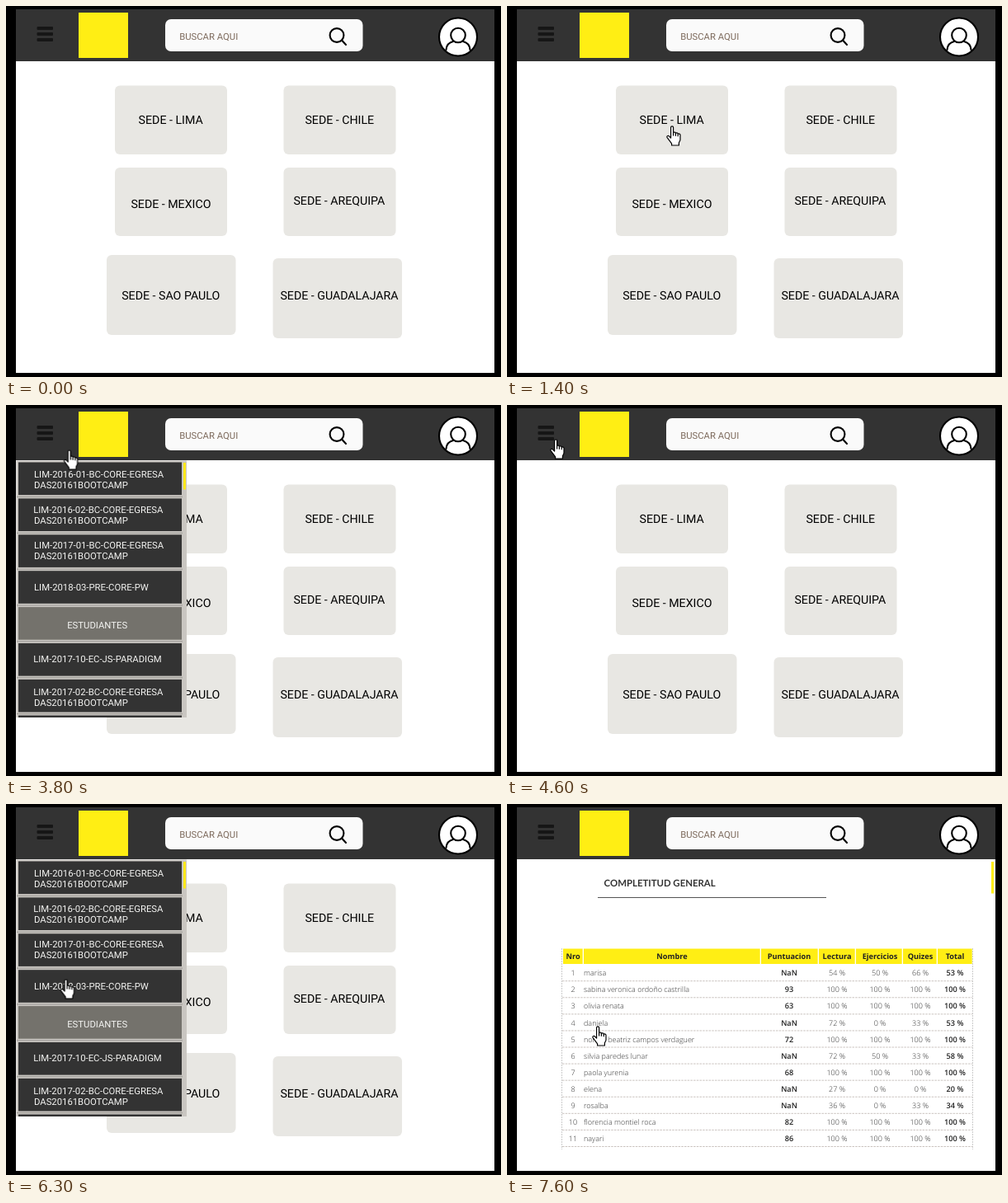
These frames come from a looping animation (600 px wide and 450 px high, 8 s). An HTML page:

```html
<!DOCTYPE html>
<html lang="es">
<head>
<meta charset="utf-8">
<title>Sedes</title>
<style>
  html, body { margin: 0; width: 100%; height: 100%; overflow: hidden; background: #000; }
  svg { display: block; width: 600px; height: 450px; font-family: Roboto, sans-serif; text-rendering: geometricPrecision; }
  #menu, #report, #show, #hand { animation: 8s step-end -4ms infinite; }
  #menu { animation-name: menu; }
  #report { animation-name: report; }
  #show { animation-name: show; }
  #hand { animation-name: move; }
  #cards { font-size: 14.2px; }
  #menu text { font-size: 11.3px; fill: #f4f4f2; }
  #report { font: 300 9px "Open Sans", "Noto Sans", sans-serif; fill: #333; }
  #report .bold { font-weight: 600; font-size: 9.2px; fill: #222; }
  #report .head { font-weight: 700; font-size: 9.2px; fill: #222; }
  .mid { text-anchor: middle; }

  @keyframes menu {
    0% { opacity: 0; }
    30% { opacity: 1; }
    57.5% { opacity: 0; }
    71.25% { opacity: 1; }
    95%, 100% { opacity: 0; }
  }
  @keyframes report {
    0% { opacity: 0; }
    95%, 100% { opacity: 1; }
  }
  @keyframes show {
    0% { opacity: 0; }
    6.25%, 100% { opacity: 1; }
  }
  @keyframes move {
    0% { transform: translate(168px, 19px); }
    7.5% { transform: translate(168px, 19px); animation-timing-function: steps(8, end); }
    17.5% { transform: translate(193px, 145px); }
    38.75% { transform: translate(193px, 145px); animation-timing-function: steps(8, end); }
    48.75% { transform: translate(52px, 41px); }
    75% { transform: translate(52px, 41px); animation-timing-function: steps(4, end); }
    80% { transform: translate(70px, 269px); }
    81.25% { transform: translate(70px, 269px); animation-timing-function: steps(4, end); }
    86.25%, 100% { transform: translate(103px, 269px); }
  }
</style>
</head>
<body>
<svg viewBox="0 0 600 450">
  <rect width="600" height="450"/>
  <rect x="12" y="4" width="580" height="441" fill="#fff"/>

  <g id="top">
    <rect x="12" y="4" width="580" height="63" fill="#333"/>
    <g fill="#161616">
      <rect x="37.5" y="25" width="19.5" height="4" rx="1"/>
      <rect x="37.5" y="32" width="19.5" height="4" rx="1"/>
      <rect x="37.5" y="39" width="19.5" height="4" rx="1"/>
    </g>
    <rect x="88" y="8" width="60" height="55" fill="#ffee14"/>
    <rect x="193" y="16" width="239.5" height="39" rx="7" fill="#fafafa"/>
    <text x="210.2" y="41.3" font-size="11.3" fill="#7d6a5c">BUSCAR AQUI</text>
    <g fill="none" stroke="#000" stroke-width="2.1" stroke-linecap="round">
      <circle cx="401" cy="35.5" r="8.4"/>
      <path d="M407 41.5L412 47"/>
      <circle cx="548" cy="37.5" r="23" fill="#fff"/>
      <circle cx="548" cy="35.5" r="8.8"/>
      <path d="M533.5 53C534 47.5 537.5 44 542 43M554 43C558.5 44 562 47.5 562.5 53"/>
    </g>
  </g>

  <g id="cards"></g>

  <g id="menu">
    <rect x="12.5" y="67.5" width="206.5" height="311.5" fill="#c9c6c1"/>
    <rect x="215" y="70" width="3" height="32.5" fill="#ffe91a"/>
    <rect x="15" y="376.5" width="198" height="2.5" fill="#333"/>
  </g>

  <g id="report">
    <rect x="12" y="67" width="580" height="378" fill="#fff"/>
    <rect x="587" y="70" width="3" height="38.5" fill="#ffee14"/>
    <text x="117.6" y="99.7" font-family="Lato, sans-serif" font-weight="700" font-size="11.4">COMPLETITUD GENERAL</text>
    <path d="M110 113.5H387" stroke="#555"/>
    <path d="M66.5 175V419M564.5 175V419" stroke="#ccc" stroke-dasharray="2 1"/>
  </g>

  <g id="show">
    <g id="hand" fill="#fff" stroke="#000" stroke-width="1.2" stroke-linejoin="round">
      <path d="M5.6 2.2C5.6.4 8.6.4 8.6 2.2V8.6C9.4 7.6 11.4 7.9 11.4 9.3C12.2 8.5 14.2 8.8 14.2 10.2C15.2 9.6 17 10.2 17 11.6V17C17 18.8 15.4 19.8 15.4 21.5V24H6.6V21.8L1.2 14.6C.2 13 2 11.6 3.4 12.8L5.6 15Z"/>
      <path d="M8.6 8.6V12.6M11.4 9.3V12.8M14.2 10.2V13.2" fill="none"/>
    </g>
  </g>
</svg>
<script>
  const $ = id => document.getElementById(id);

  function add(parent, tag, attrs, text) {
    const el = document.createElementNS(parent.namespaceURI, tag);
    for (const key in attrs) el.setAttribute(key, attrs[key]);
    if (text !== undefined) el.textContent = text;
    parent.append(el);
  }

  // card: x, y, w, h, then text x and baseline
  [
    ["LIMA", 132, 96.5, 136, 83.5, 160.6, 143],
    ["CHILE", 336.5, 96.5, 136, 83.5, 362.4, 143],
    ["MEXICO", 132, 196, 136, 83, 151.4, 245],
    ["AREQUIPA", 336.5, 196, 136, 83, 348.4, 241.3],
    ["SAO PAULO", 122, 302, 156.5, 97, 140.2, 355.5],
    ["GUADALAJARA", 323.5, 306, 156.5, 97, 332.4, 355.5]
  ].forEach(([city, x, y, width, height, tx, ty]) => {
    add($("cards"), "rect", { x, y, width, height, rx: 6, fill: "#e8e7e3" });
    add($("cards"), "text", { x: tx, y: ty }, "SEDE - " + city);
  });

  const camp = "DAS20161BOOTCAMP";
  [
    [34, 87.5, "LIM-2016-01-BC-CORE-EGRESA", camp],
    [33.2, 131, "LIM-2016-02-BC-CORE-EGRESA", camp],
    [34, 174, "LIM-2017-01-BC-CORE-EGRESA", camp],
    [34, 225, "LIM-2018-03-PRE-CORE-PW"],
    [74.2, 271, "ESTUDIANTES"],
    [33.2, 311.8, "LIM-2017-10-EC-JS-PARADIGM"],
    [33.2, 352, "LIM-2017-02-BC-CORE-EGRESA", camp]
  ].forEach(([x, y, ...lines], i) => {
    const top = 69.5 + i * 43.9;
    add($("menu"), "rect", { x: 15, y: top, width: 198, height: 39.6, fill: i === 4 ? "#74726c" : "#333" });
    add($("menu"), "rect", { x: 13, y: top + 41.4, width: 201, height: 0.8, fill: "#8d8b87" });
    lines.forEach((line, n) => add($("menu"), "text", { x: n ? 34 : x, y: y + n * 13.2 }, line));
  });

  const report = $("report");
  const mids = [80, 200, 342, 400, 452, 501, 543];
  const edges = [68, 93, 308, 378, 423, 480, 522, 565];
  ["Nro", "Nombre", "Puntuacion", "Lectura", "Ejercicios", "Quizes", "Total"].forEach((name, i) => {
    add(report, "rect", { x: edges[i], y: 175.5, width: edges[i + 1] - edges[i] - 1.3, height: 18.5, fill: "#ffee14" });
    add(report, "text", { x: mids[i], y: 188.3, class: "head mid" }, name);
  });

  const full = [100, 100, 100, 100];
  [
    ["marisa", "NaN", 54, 50, 66, 53],
    ["sabina veronica ordoño castrilla", 93, ...full],
    ["olivia renata", 63, ...full],
    ["daniela", "NaN", 72, 0, 33, 53],
    ["norma beatriz campos verdaguer", 72, ...full],
    ["silvia paredes lunar", "NaN", 72, 50, 33, 58],
    ["paola yurenia", 68, ...full],
    ["elena", "NaN", 27, 0, 0, 20],
    ["rosalba", "NaN", 36, 0, 33, 34],
    ["florencia montiel roca", 82, ...full],
    ["nayari", 86, ...full]
  ].forEach(([name, score, ...parts], i) => {
    const y = 208.3 + i * 20.08;
    add(report, "text", { x: mids[0], y, class: "mid" }, i + 1);
    add(report, "text", { x: 93, y }, name);
    add(report, "text", { x: mids[2], y, class: "mid bold" }, score);
    parts.forEach((p, n) =>
      add(report, "text", { x: mids[3 + n], y, class: n === 3 ? "mid bold" : "mid" }, p + " %"));
    add(report, "path", { d: `M67 ${y + 6.4}H564`, stroke: "#c4bdb8", "stroke-width": 0.9, "stroke-dasharray": "2.5 1.2" });
  });
</script>
</body>
</html>
```
